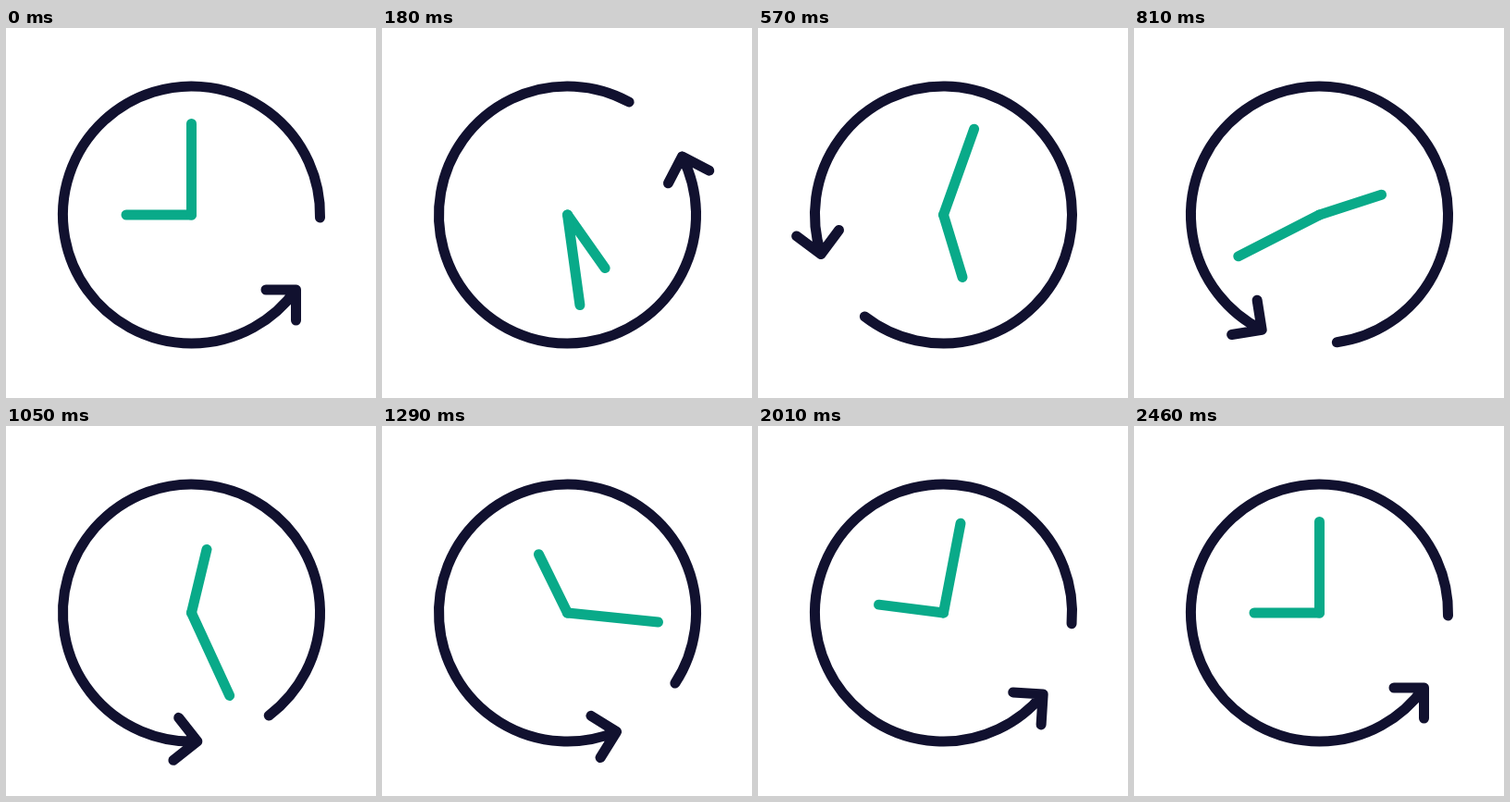
Write an HTML page that moves like this. It is 400 by 400 pixels and loops after 2.52 s.

```html
<!DOCTYPE html>
<html lang="en">
<head>
<meta charset="utf-8">
<title>Clock</title>
<style>
  html, body { margin: 0; height: 100%; overflow: hidden; background: #fff; }
  svg { display: block; width: 100%; height: 100%; }
  path { fill: none; stroke-width: 11; stroke-linecap: round; stroke-linejoin: round; }
  #ring { stroke: #11112f; }
  .hand { stroke: #09aa89; }
</style>
</head>
<body>
<svg viewBox="-200.5 -202 400 400">
  <path id="ring" d="M139 3A139.03 139.03 0 1 0 113 81M80.5 81H113V114"/>
  <path id="hour" class="hand" d="M0 0H-70.5"/>
  <path id="minute" class="hand" d="M0 0V-98.5"/>
</svg>
<script>
  const LOOP = 2520, SPIN = 2450, STEP = 30;
  const turns = { ring: 1, hour: 2, minute: 3 };

  // cubic-bezier(1/6, 1/6, 0, 1): quick start, long settle
  function ease(x) {
    if (x >= 1) return 1;
    let low = 0, high = 1, s;
    for (let i = 0; i < 30; i++) {
      s = (low + high) / 2;
      if (s * (1 - s) ** 2 / 2 + s ** 3 < x) low = s;
      else high = s;
    }
    return x + 3 * s * s * (1 - s);
  }

  const start = performance.now();
  function draw() {
    const time = (performance.now() - start) % LOOP;
    const progress = ease(Math.floor(time / STEP) * STEP / SPIN);
    for (const id in turns) {
      document.getElementById(id).setAttribute('transform', `rotate(${-360 * turns[id] * progress})`);
    }
    requestAnimationFrame(draw);
  }
  draw();
</script>
</body>
</html>
```
